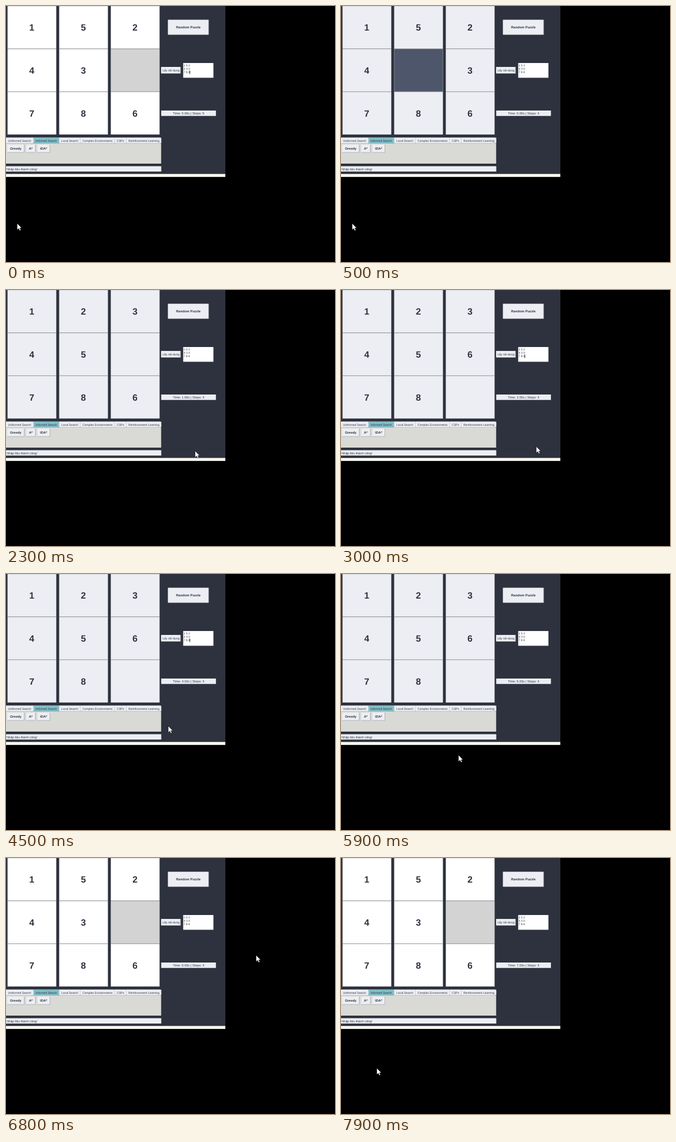
Animation, 588 px wide and 458 px high, one loop 8 s. Source, as an HTML page:

```html
<!DOCTYPE html>
<html lang="vi">
<head>
<meta charset="utf-8">
<title>Eight puzzle solver</title>
<style>
html, body { margin: 0; width: 100%; height: 100%; overflow: hidden; background: #000; }
svg { display: block; width: 588px; height: 458px; }
text { font-family: "Liberation Sans", Arial, sans-serif; fill: #2e3440; text-rendering: geometricPrecision; white-space: pre; }
.bold { font-weight: bold; }
</style>
</head>
<body>
<svg id="stage" viewBox="0 0 588 458"></svg>
<script>
const LOOP = 8000, FRAME = 100;
const MOVE = 500, GLOW = 300, SOLVE = 400, RESET = 6800;
const NAVY = '#2e323e', PALE = '#eceef3', TEAL = '#8cc1cd', SLATE = '#4d566a', EDGE = '#a5a7ac';
const stage = document.getElementById('stage');

function add(tag, attrs, content = '') {
  const el = document.createElementNS('http://www.w3.org/2000/svg', tag);
  for (const key in attrs) el.setAttribute(key, attrs[key]);
  el.textContent = content;
  return stage.appendChild(el);
}
const rect = (x, y, width, height, fill) => add('rect', { x, y, width, height, fill });
const label = (x, y, size, str, more) => add('text', { x, y, 'font-size': size, ...more }, str);
const centred = { 'text-anchor': 'middle' };
const heading = { ...centred, class: 'bold' };

function button(x, y, w, h, str, size, style) {
  rect(x, y, w, h, EDGE);
  rect(x, y, w - 0.8, h - 0.8, PALE);
  label(x + w / 2, y + h / 2 + size * 0.34, size, str, style);
}

// Lays out boxes as wide as their text plus padding
function row(x, names, size, style, pad, gap, draw) {
  for (const name of names) {
    const probe = label(0, 0, size, name, style);
    const w = probe.getComputedTextLength() + pad;
    probe.remove();
    draw(x, w, name);
    x += w + gap;
  }
}

// Window and board
rect(0, 0, 392, 300, NAVY);
rect(0, 300.4, 392, 5.4, '#fdfdf6');
const tiles = Array.from({ length: 9 }, (_, i) => {
  const x = 2.5 + 92.3 * (i % 3), y = 0.2 + 76.8 * Math.floor(i / 3);
  rect(x, y - 0.7, 87.6, 77, EDGE);
  return {
    face: rect(x + 0.6, y + 0.2, 86.4, 75.6, PALE),
    digit: label(x + 43.5, y + 44, 16.3, '', heading)
  };
});

// Tabs, algorithm buttons and status line
rect(0, 235.3, 276, 10.4, '#c9cbce');
const tabs = ['Uniformed Search', 'Informed Search', 'Local Search',
  'Complex Environments', 'CSPs', 'Reinforcement Learning'];
row(0, tabs, 5.2, centred, 6.8, 0.8, (x, w, name) => {
  rect(x, 235.7, w, 9.8, name === 'Informed Search' ? '#80bdc7' : PALE);
  label(x + w / 2, 242.7, 5.2, name, centred);
});
rect(0, 246, 277.3, 36, '#d9d9d5');
row(2, ['Greedy', 'A*', 'IDA*'], 5.9, heading, 10.5, 3,
  (x, w, name) => button(x, 248, w, 14.5, name, 5.9, heading));
rect(0, 286.6, 277.5, 9.6, PALE);
label(1, 293.5, 5.65, 'Nhập liệu thành công!');

// Right-hand panel
button(289.5, 24.7, 73, 27, 'Random Puzzle', 5.95, heading);
button(277.3, 109, 35, 12, 'Lấy nội dung', 5.3, centred);
rect(316.7, 102, 54, 26.4, '#fff');
['1 5 2', '4 3 0', '7 8 6'].forEach((line, i) => label(317.4, 107.8 + 6.1 * i, 5.1, line));
const caret = rect(328.2, 115.4, 0.9, 6.4, '#111');
rect(277.4, 187, 97.8, 9.7, PALE);
const timer = label(326.2, 193.9, 5.8, '', { ...centred, fill: '#3b4252' });

const pointer = add('path', {
  d: 'M0 0V11.4L2.7 9L4.6 13L6.5 12.1L4.7 8.3H8Z',
  fill: '#fff', stroke: '#000', 'stroke-width': 0.5
});

// The blank slides left, up, right, down, down
const slides = [-1, -3, 1, 3, 3];

function board(t) {
  const cells = [...'152430786'];
  const count = t < RESET ? Math.min(slides.length, Math.floor(t / MOVE)) : 0;
  let blank = cells.indexOf('0'), last = blank;
  for (const slide of slides.slice(0, count)) {
    last = blank;
    blank += slide;
    [cells[last], cells[blank]] = [cells[blank], cells[last]];
  }
  const glowing = count > 1 && t - count * MOVE < GLOW;
  return { cells, lit: glowing ? [last, blank] : [] };
}

function faceColour(t, blank, lit) {
  if (t < SOLVE || t >= RESET) return blank ? '#d3d3d3' : '#fff';
  if (lit) return TEAL;
  return blank && t < 2 * MOVE ? SLATE : PALE;
}

// Pointer gestures: start, duration, x, y to reach
const gestures = [
  [900, 600, 46, 374], [1500, 300, 64, 313], [1900, 400, 338, 288],
  [2500, 300, 349, 280], [4000, 500, 290, 272], [4900, 400, 410, 225],
  [5300, 600, 210, 324], [5900, 800, 447, 174], [6900, 1000, 64, 376]
];
const smooth = k => k * k * (3 - 2 * k);

function tipAt(t) {
  let x = 20, y = 389;
  for (const [start, length, toX, toY] of gestures) {
    const k = smooth(Math.min(1, Math.max(0, (t - start) / length)));
    x += (toX - x) * k;
    y += (toY - y) * k;
  }
  return [x, y];
}

function draw(t) {
  const { cells, lit } = board(t);
  tiles.forEach(({ face, digit }, i) => {
    const blank = cells[i] === '0';
    face.setAttribute('fill', faceColour(t, blank, lit.includes(i)));
    digit.textContent = blank ? '' : cells[i];
  });

  const secs = Math.max(0, Math.floor((t - MOVE) / 1000));
  const drift = Math.min(0.03, Math.floor(secs / 2.5) * 0.02);
  timer.textContent = `Time: ${(secs + drift).toFixed(2)}s | Steps: ${t < MOVE ? 5 : 4}`;

  // The caret shows for 600 ms and hides for 300 ms
  caret.setAttribute('opacity', (t + 100) % 900 < 600 ? 1 : 0);
  pointer.setAttribute('transform', `translate(${tipAt(t)})`);
}

function frame() {
  const t = performance.now() % LOOP;
  draw(Math.floor(t / FRAME) * FRAME);
  requestAnimationFrame(frame);
}
frame();
</script>
</body>
</html>
```
